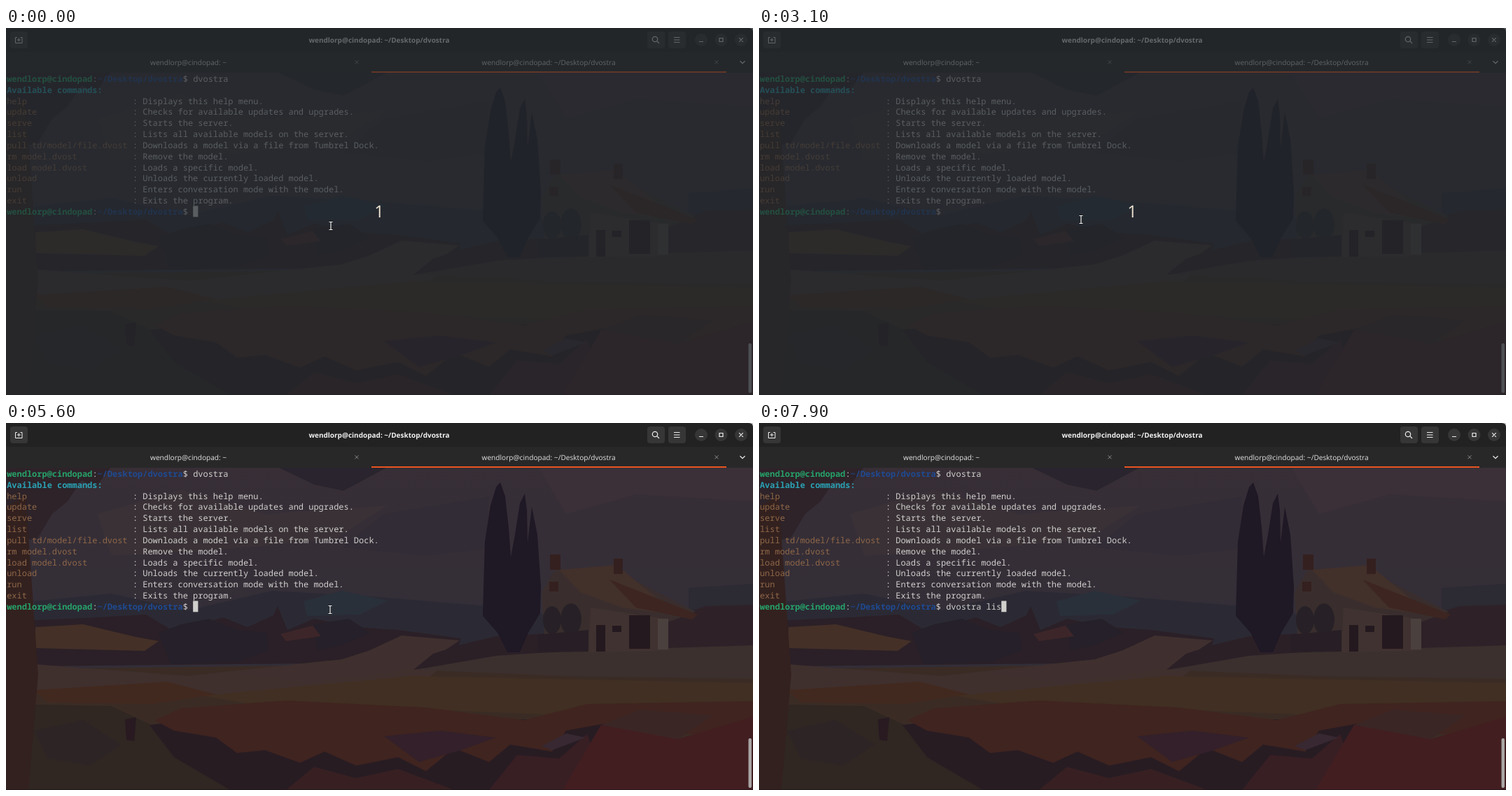
An HTML page for the animation above (8000 ms loop, 1067x525 px).

```html
<!DOCTYPE html>
<html lang="en">
<head>
<meta charset="utf-8">
<title>Terminal session</title>
<style>
html, body { margin: 0; width: 100%; height: 100%; overflow: hidden; background: #222; }
svg { display: block; width: 100vw; height: 100vh; }
text { white-space: pre; text-rendering: geometricPrecision; }
.ui { font: 10.15px "Open Sans", "Noto Sans", sans-serif; fill: #e4e4e4; }
.title { font-size: 10px; font-weight: 700; fill: #f2f2f2; }
.mono { font: 11.98px "Noto Sans Mono", "DejaVu Sans Mono", monospace; fill: #d0cfcc; }
.user { fill: #26a269; font-weight: 700; }
.path { fill: #1f4a92; font-weight: 700; }
.head { fill: #2aa1b3; font-weight: 700; }
.cmd { fill: #8f6748; }
.icon { fill: none; stroke: #eee; stroke-width: 1.2; }
.count { font: 24px "Open Sans", "Noto Sans", sans-serif; fill: #efe3d3; }
</style>
</head>
<body>
<svg viewBox="0 0 1067 525" preserveAspectRatio="none">
  <defs>
    <linearGradient id="sky" x1="0" y1="0" x2="0" y2="1">
      <stop offset="0" stop-color="#372e36"/>
      <stop offset="1" stop-color="#322e38"/>
    </linearGradient>
  </defs>

  <g id="wallpaper">
    <rect y="63" width="1067" height="290" fill="url(#sky)"/>
    <polygon fill="#393136" points="130,130 250,95 370,130 545,118 470,166 300,182 150,190"/>
    <polygon fill="#3b3038" points="760,63 1067,63 1067,112 900,102 800,130"/>
    <polygon fill="#29242d" points="388,63 545,63 482,97 440,88"/>
    <polygon fill="#312c36" points="540,130 690,105 685,180 600,190 480,178"/>
    <polygon fill="#2b2a34" points="40,255 150,244 260,268 380,240 520,248 690,262 780,275 780,330 40,320"/>
    <polygon fill="#29303a" points="425,255 480,240 545,254 505,274 430,276"/>
    <polygon fill="#2c2a33" points="975,236 1067,230 1067,290 975,285"/>
    <polygon fill="#2d2329" points="0,63 150,63 128,92 108,82 88,112 66,130 45,165 0,172"/>

    <polygon fill="#3a2c25" points="0,352 580,345 1067,322 1067,525 0,525"/>
    <polygon fill="#2b2027" points="40,282 130,278 200,274 240,298 310,278 345,292 382,275 388,262 402,296 440,280 500,292 560,296 650,308 640,342 40,348"/>
    <polygon fill="#252029" points="218,300 250,288 290,280 330,296 372,300 376,325 330,342 235,345"/>
    <polygon fill="#252029" points="440,288 490,280 520,300 480,318 445,325"/>
    <polygon fill="#443027" points="42,292 110,288 185,306 218,312 198,326 42,322"/>
    <polygon fill="#3d2629" points="392,302 438,290 450,305 400,312"/>
    <polygon fill="#3f302e" points="40,345 260,362 460,340 640,334 590,375 300,390 40,382"/>
    <polygon fill="#3f302f" points="648,311 565,304 520,325 480,338 330,357 430,372 590,350"/>
    <polygon fill="#2c2027" points="582,353 610,330 650,317 700,305 790,300 790,329 700,334 640,346"/>
    <polygon fill="#3b302e" points="585,353 700,333 760,329 1067,315 1067,366 800,362"/>
    <polygon fill="#402f22" points="280,390 580,362 1067,372 1067,402 850,420 600,410 350,402"/>
    <polygon fill="#42291f" points="40,382 230,370 300,388 210,402 60,400"/>

    <polygon fill="#302622" points="0,402 150,405 225,440 330,525 0,525"/>
    <polygon fill="#2d2426" points="40,440 110,425 165,460 120,490 60,480"/>
    <polygon fill="#281c23" points="205,432 300,420 860,425 860,525 320,525 240,478"/>
    <polygon fill="#40241f" points="212,425 250,408 400,397 600,407 740,425 830,402 1067,398 1067,445 900,445 855,430 800,440 780,470 720,460 690,485 640,465 600,498 560,478 500,490 455,470 420,486 370,468 330,472 300,450 240,440"/>
    <polygon fill="#33202a" points="540,448 620,440 700,450 650,468 590,485"/>
    <polygon fill="#382022" points="400,525 440,492 500,508 560,495 640,525"/>
    <polygon fill="#381f24" points="690,525 730,475 790,480 830,445 860,525"/>
    <polygon fill="#421e21" points="795,525 850,432 960,452 1067,420 1067,525"/>
    <polygon fill="#3b2626" points="850,432 905,410 1010,418 960,452"/>
    <polygon fill="#372831" points="765,462 800,444 828,450 780,468"/>
    <polygon fill="#281a20" points="170,424 186,421 183,455 172,453"/>
    <polygon fill="#33211f" points="0,120 28,104 46,360 32,525 0,525"/>

    <polygon fill="#2e2228" points="945,280 1000,262 1067,260 1067,318 945,322"/>
    <polygon fill="#392e2d" points="765,242 785,208 880,216 985,270 945,285 945,322 770,312"/>
    <polygon fill="#42302b" points="790,210 872,203 905,230 960,275 880,264 820,242"/>
    <polygon fill="#3d2521" points="862,224 988,274 980,281 900,264"/>
    <polygon fill="#403230" points="835,264 940,280 945,326 832,328"/>
    <path fill="#34201f" d="M777 188h15v22h-15zM868 194h13v22h-13zM776 227h13v14h-13z"/>
    <path fill="#24191f" d="M843 289h13v38h-13zM866 290h13v9h-13zM890 275h30v48h-30z"/>
    <rect x="931" y="280" width="15" height="44" fill="#4a403d"/>
    <ellipse cx="780" cy="282" rx="13" ry="20" fill="#272127"/>
    <ellipse cx="807" cy="281" rx="15" ry="23" fill="#272127"/>
    <polygon fill="#281f26" points="758,303 832,296 832,327 760,328"/>
    <polygon fill="#1f1825" points="681,276 684,170 692,118 700,92 706,85 713,105 718,150 721,192 727,160 734,115 741,101 744,125 745,172 751,120 759,160 764,235 763,272 746,300 734,328 716,328 702,300"/>
  </g>

  <g id="chrome">
    <rect width="1067" height="35" fill="#222"/>
    <rect y="34" width="1067" height="30" fill="#282828"/>
    <rect x="522" y="62" width="507" height="2" fill="#e95420"/>
    <path d="M1061 0h6v6q0-6-6-6z" fill="#ccc"/>
    <g fill="#363636">
      <rect x="6" y="5" width="25" height="24" rx="4"/>
      <rect x="916" y="5" width="25" height="24" rx="4"/>
      <rect x="946" y="5" width="25" height="24" rx="4"/>
      <circle cx="993" cy="17" r="9"/>
      <circle cx="1021.5" cy="17" r="9"/>
      <circle cx="1050" cy="17" r="9"/>
    </g>
    <g class="icon">
      <path stroke-width="1" d="M16 13.500h-2.500v8h9.500v-8h-2.500M18.300 14.500v5M15.800 17h5"/>
      <circle cx="927" cy="16" r="3.700"/>
      <path d="M929.700 18.700l3.300 3.300M954 13.500h8.500M954 17h8.500M954 20.500h8.500"/>
      <path d="M990 19.500h6M1019 14.500h5v5h-5zM1047.200 14.200l5.600 5.600m0-5.600l-5.600 5.600"/>
      <path d="M1048.500 47.300l3.500 3.400 3.500-3.400"/>
      <path stroke="#888" stroke-width="1" d="M498.500 46.300l5 5m0-5l-5 5M1012.500 46.300l5 5m0-5l-5 5"/>
    </g>
    <text id="title" class="ui title" x="533" y="20.700" text-anchor="middle"></text>
    <text id="tabA" class="ui" x="206" y="52.500"></text>
    <text id="tabB" class="ui" x="679.500" y="52.500"></text>
    <rect x="1060.500" y="451" width="4.500" height="71" rx="2.200" fill="#aaa6a5"/>
    <path d="M0 524.500h1067" stroke="#191719" opacity=".6"/>
  </g>

  <g id="screen"></g>
  <rect id="caret" y="254.500" width="7.200" height="15.800" fill="#d0cfcc"/>
  <g id="dim">
    <rect width="1067" height="525" fill="rgb(35,41,45)" opacity=".68"/>
    <text class="count" x="533" y="270.500" text-anchor="middle">1</text>
  </g>
  <g id="pointer" fill="none">
    <path d="M-2.500 -5.500h5M0 -5v10M-2.500 5.500h5" stroke="#111" stroke-width="2.400" opacity=".6"/>
    <path d="M-2.500 -5.500h5M0 -5v10M-2.500 5.500h5" stroke="#f4f4f4" stroke-width="1.200"/>
  </g>
</svg>

<script>
const LOOP = 8000, STEP = 100, LEFT = 1.2, CELL = 7.188, TOP = 77, ROW = 15.82;
const USER = "wendlorp@cindopad", APP = "dvostra", DIR = "~/Desktop/" + APP;
const PROMPT = (USER + ":" + DIR + "$ ").length;
const $ = id => document.getElementById(id);

function put(col, row, str, cls = "") {
  const el = document.createElementNS("http://www.w3.org/2000/svg", "text");
  el.setAttribute("x", LEFT + col * CELL);
  el.setAttribute("y", TOP + row * ROW);
  el.setAttribute("class", "mono " + cls);
  el.textContent = str;
  $("screen").append(el);
  return el;
}

function prompt(row, typed) {
  const at = USER.length;
  put(0, row, USER, "user");
  put(at, row, ":");
  put(at + 1, row, DIR, "path");
  put(PROMPT - 2, row, "$");
  return put(PROMPT, row, typed);
}

const help = [
  ["help", "Displays this help menu."],
  ["update", "Checks for available updates and upgrades."],
  ["serve", "Starts the server."],
  ["list", "Lists all available models on the server."],
  ["pull td/model/file.dvost", "Downloads a model via a file from Tumbrel Dock."],
  ["rm model.dvost", "Remove the model."],
  ["load model.dvost", "Loads a specific model."],
  ["unload", "Unloads the currently loaded model."],
  ["run", "Enters conversation mode with the model."],
  ["exit", "Exits the program."]
];

$("title").textContent = $("tabB").textContent = USER + ": " + DIR;
$("tabA").textContent = USER + ": ~";
prompt(0, APP);
put(0, 1, "Available commands:", "head");
help.forEach(([cmd, info], i) => {
  put(0, i + 2, cmd, "cmd");
  put(25, i + 2, ": " + info);
});
const input = prompt(12, "");

// time, x, y
const moves = [
  [0, 464, 283], [600, 464, 283], [700, 463, 284], [900, 459, 285],
  [1200, 459, 285], [1500, 450, 279], [1900, 450, 279], [2200, 457, 275],
  [2400, 457, 275], [2700, 460, 275], [3000, 460, 275], [3900, 462, 262],
  [4200, 462, 262], [4500, 465, 265], [4700, 463, 267], [LOOP, 463, 267]
];
const blinks = [300, 800, 1400, 2000, 2600, 3200, 3800, 4400, 5000, 5600, 6200, 6600];
const keys = [6700, 6800, 7000, 7100, 7200, 7300, 7400, 7500, 7700, 7800, 7900];
const past = (list, t) => list.filter(v => v <= t).length;
const show = (el, on) => el.setAttribute("visibility", on ? "visible" : "hidden");

function place(t) {
  const i = moves.findIndex(m => m[0] > t);
  const [t0, x0, y0] = moves[i - 1], [t1, x1, y1] = moves[i];
  const k = (t - t0) / (t1 - t0);
  return [x0 + (x1 - x0) * k, y0 + (y1 - y0) * k].map(Math.round);
}

function draw(ms) {
  const t = Math.floor(ms % LOOP / STEP) * STEP;
  const typed = past(keys, t);
  input.textContent = (APP + " list").slice(0, typed);
  $("caret").setAttribute("x", LEFT + (PROMPT + typed) * CELL);
  show($("caret"), past(blinks, t) % 2 === 0);
  show($("dim"), t < 4000);
  show($("pointer"), t < 6600);
  $("pointer").setAttribute("transform", `translate(${place(t)})`);
}

const start = performance.now();
function tick() {
  draw(performance.now() - start);
  requestAnimationFrame(tick);
}
tick();
</script>
</body>
</html>
```
